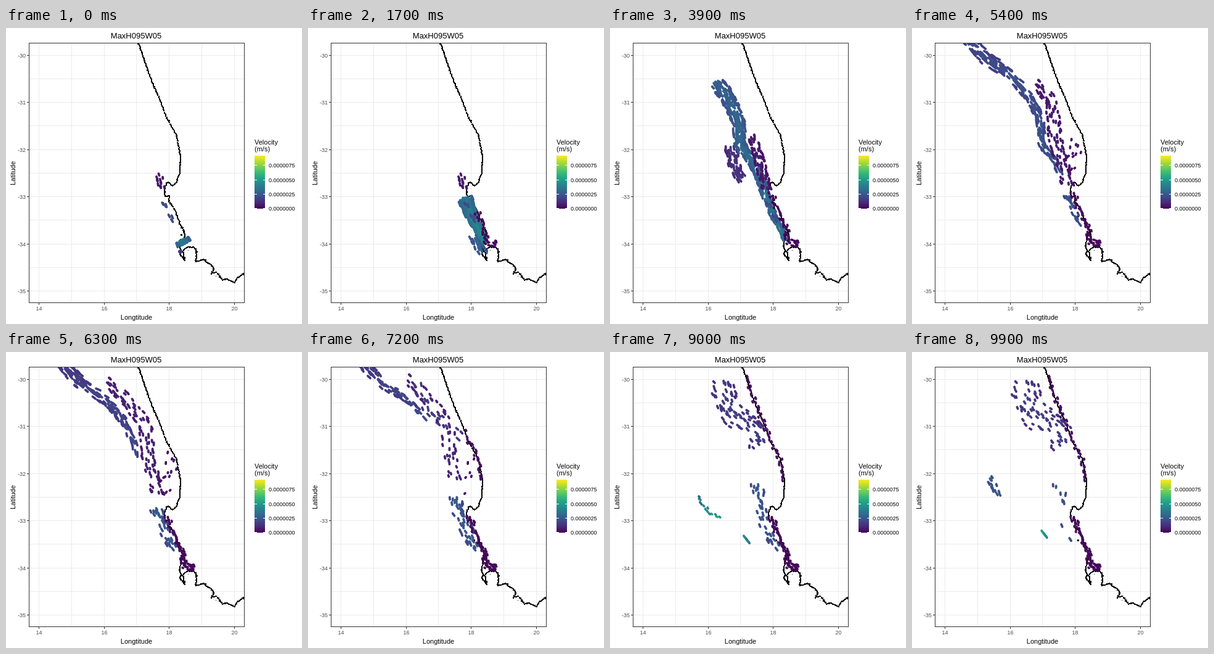
Recreate the animation shown at these times as an HTML page with a canvas. Size 480 by 480 pixels, loop 10 s.

```html
<!DOCTYPE html>
<html lang="en">
<head>
<meta charset="utf-8">
<title>Drift map</title>
<style>
  html, body { margin: 0; width: 100%; height: 100%; overflow: hidden; background: #fff; }
  svg, canvas, #bar { position: absolute; }
  svg { left: 0; top: 0; font: 11px "Liberation Sans", Arial, sans-serif; }
  canvas { left: 38px; top: 25px; }
  #bar { left: 403px; top: 207px; width: 17px; height: 86px; }
  .small { font-size: 9px; fill: #4d4d4d; }
  .line { fill: none; stroke: #333; shape-rendering: crispEdges; }
  .notch { stroke: #fff; }
</style>
</head>
<body>
<div id="bar"></div>
<canvas id="map" width="348" height="420"></canvas>
<svg id="chart" width="480" height="480">
  <text x="211" y="17" font-size="13" text-anchor="middle">MaxH095W05</text>
  <text x="211.5" y="473" text-anchor="middle">Longtitude</text>
  <text transform="translate(15 235.5) rotate(-90)" text-anchor="middle">Latitude</text>
  <text x="403" y="189">Velocity</text>
  <text x="403" y="200">(m/s)</text>
  <rect class="line" x="37.5" y="24.5" width="349" height="421"/>
</svg>
<script>
const LOOP = 10000, STEP = 100;
const VIRIDIS = ['#440154', '#482878', '#3e4a89', '#31688e', '#26828e',
                 '#1f9e89', '#35b779', '#6dcd59', '#b4de2c', '#fde725'];
const RGB = VIRIDIS.map(h => [1, 3, 5].map(i => parseInt(h.slice(i, i + 2), 16)));

const lerp = (a, b, t) => a + (b - a) * t;
const clamp = v => Math.min(1, Math.max(0, v));
// Goes from one value to another between two times
const ramp = (t, start, end, from, to) => lerp(from, to, clamp((t - start) / (end - start)));

let seed = 7;
const rand = () => (seed = seed * 16807 % 2147483647) / 2147483647;
const jitter = r => (rand() * 2 - 1) * r;

function colour(v) {
  const p = Math.min(.999, clamp(v)) * 9, i = Math.floor(p);
  return `rgb(${RGB[i].map((c, k) => Math.round(lerp(c, RGB[i + 1][k], p - i)))})`;
}

// Polyline measured by its length; at(u) gives the point at share u
function route(pts) {
  const legs = [];
  let total = 0;
  for (let i = 0; i < pts.length - 2; i += 2) {
    const [x, y, x2, y2] = pts.slice(i, i + 4);
    const size = Math.hypot(x2 - x, y2 - y);
    legs.push({ x, y, x2, y2, size, start: total });
    total += size;
  }
  const at = u => {
    const d = clamp(u) * total;
    const leg = legs.findLast(l => l.start <= d);
    const k = (d - leg.start) / leg.size;
    return [lerp(leg.x, leg.x2, k), lerp(leg.y, leg.y2, k)];
  };
  const angle = u => {
    const [x, y] = at(u - .04), [x2, y2] = at(u + .04);
    return Math.atan2(y2 - y, x2 - x);
  };
  return { total, at, angle };
}

// Axes, grid and legend
const chart = document.getElementById('chart');
const grid = new Path2D();
function add(tag, attrs, text) {
  const el = document.createElementNS('http://www.w3.org/2000/svg', tag);
  for (const k in attrs) el.setAttribute(k, attrs[k]);
  if (text) el.textContent = text;
  chart.append(el);
}
const line = (cls, d) => add('path', { class: 'line ' + cls, d });

for (let lon = 14; lon <= 20; lon++) {
  const x = Math.round(53 + (lon - 14) * 52.8) + .5;
  grid.rect(x - .5, 25, 1, 420);
  if (lon % 2) continue;
  line('', `M${x} 446v3`);
  add('text', { class: 'small', x, y: 458, 'text-anchor': 'middle' }, `${lon}`);
}
for (let lat = -30; lat >= -35; lat -= .5) {
  const y = Math.round(43.85 - (lat + 30) * 76.43) + .5;
  grid.rect(38, y - .5, 348, 1);
  if (lat % 1) continue;
  line('', `M34 ${y}h3`);
  add('text', { class: 'small', x: 32, y: y + 3, 'text-anchor': 'end' }, `${lat}`);
}
['0000', '0025', '0050', '0075'].forEach((digits, i) => {
  const y = Math.round(292 - i * 23.2) + .5;
  line('notch', `M403 ${y}h3.5M416.5 ${y}h3.5`);
  add('text', { class: 'small', x: 426, y: y + 3, style: 'fill:#000' }, '0.000' + digits);
});
document.getElementById('bar').style.background = `linear-gradient(to top, ${VIRIDIS})`;

// Coastline: key points joined by a rough row of pixel dots
const COAST = [
  215,25, 231,72, 250,118, 261,146, 276,173, 283,208, 282,235, 276,251, 270,256, 263,250,
  260,252, 257,261, 258,274, 265,272, 263,280, 270,289, 276,300, 282,317, 289,331, 290,342,
  284,343, 281,353, 284,360, 282,366, 290,377, 287,362, 291,357, 297,355, 305,356, 309,361,
  308,379, 323,375, 325,380, 333,384, 337,390, 333,398, 341,396, 351,408, 358,407, 371,413,
  375,405, 387,397];
const shore = new Path2D();
const coast = route(COAST);
const pixel = (x, y, size) => shore.rect(Math.round(x) - 1, Math.round(y) - 1, size, size);
for (let d = 0; d < coast.total; d += 1.1) {
  const [x, y] = coast.at(d / coast.total);
  pixel(x + jitter(.7), y + jitter(.7), 2);
}
pixel(269, 305, 3);
pixel(284, 335, 3);
pixel(296, 361, 1);
pixel(341, 403, 1);

// A swarm of dashes strung along a route. Settings are values or functions of
// time in seconds (and of q, the dash's share of the way from tail to head).
const swarms = [];
function swarm(n, pts, settings) {
  const dashes = Array.from({ length: n }, (_, i) => ({
    q: (i + rand()) / n, side: jitter(1), rank: rand(), turn: jitter(.2), size: 1 + jitter(.35),
  }));
  swarms.push({ path: route(pts), dashes, tail: 0, head: 1, keep: 1, bias: 1, ...settings });
}

// First release
swarm(45, [282,362, 283,363, 269,337], {
  head: t => ramp(t, 0, 1.1, .05, 1),
  width: t => ramp(t, 0, 1.1, 1.5, 8),
  keep: t => ramp(t, 0, .6, .3, 1) * ramp(t, 1.4, 2.2, 1, 0),
  len: t => ramp(t, 0, 1, 1, 5),
  speed: t => ramp(t, 0, 1, .2, .3),
});

// Western fringe
swarm(50, [240,296, 226,262, 204,235, 196,192], {
  tail: t => ramp(t, 2.4, 3.9, 0, .5),
  head: t => ramp(t, 2.2, 3.9, .3, 1),
  width: 10,
  keep: t => ramp(t, 2.1, 2.8, 0, 1) * ramp(t, 4, 5.4, 1, 0),
  len: 5,
  speed: t => ramp(t, 2.9, 3.9, .21, .14),
});

// Main plume along the current
swarm(330, [287,347, 264,302, 250,264, 233,218, 211,190, 208,150, 190,110, 160,76, 118,48, 68,-8], {
  tail: t => ramp(t, 4, 7, 0, .6),
  head: t => ramp(t, .9, 5.4, 0, 1),
  width: (t, q) => lerp(4, 13, q),
  keep: t => ramp(t, .9, 2.2, .2, 1) * ramp(t, 4, 8.4, 1, 0),
  bias: .75,
  len: 6,
  speed: (t, q) => ramp(t, 2.5, 6, .43, .19) * (1.15 - .3 * q),
});

// Slow inshore drift
swarm(110, [254,262, 244,222, 232,180, 226,120, 202,86, 166,46, 150,20], {
  tail: t => ramp(t, 5.2, 8.2, 0, .3),
  head: t => ramp(t, 2.9, 6.4, .1, .92),
  width: t => ramp(t, 3, 5, 6, 11),
  keep: t => ramp(t, 2.7, 4.5, .2, 1) * ramp(t, 6.3, 8.4, 1, .1),
  len: 3,
  speed: t => ramp(t, 5, 8, .07, .12),
});

// Eastern eddy
swarm(14, [248,228, 266,205, 274,165], {
  head: t => ramp(t, 4.6, 6.3, .5, 1),
  width: 12,
  keep: t => ramp(t, 4.4, 5.2, 0, 1) * ramp(t, 6.6, 7.8, 1, 0),
  len: 2,
  speed: .05,
});

// Late drift near the bay
swarm(55, [274,318, 256,285, 240,250, 238,214], {
  head: t => ramp(t, 4.8, 8.2, .35, 1),
  width: t => ramp(t, 5, 6.5, 2, 11),
  keep: t => ramp(t, 4.6, 8, .15, 1) * ramp(t, 8.2, 9.9, 1, .2),
  len: 4.5,
  speed: .26,
});

// Late drift in the north
swarm(75, [250,145, 222,118, 196,98, 178,50], {
  width: t => ramp(t, 7, 9.9, 10, 24),
  keep: t => ramp(t, 6.6, 8.2, 0, 1),
  len: t => ramp(t, 8, 9.9, 5, 3),
  speed: .17,
});

// Fast jet, then two short ones
swarm(14, [214,306, 195,283, 180,270, 161,260, 140,232, 125,203], {
  tail: t => ramp(t, 8.2, 9.9, .04, .76),
  head: t => ramp(t, 7.6, 9.9, .37, 1),
  width: t => ramp(t, 8.2, 9.9, 0, 5),
  keep: t => t < 7.7 ? 0 : 1,
  len: t => ramp(t, 8.2, 9.9, .5, 3),
  speed: (t, q) => ramp(t, 8.2, 9.4, 1.1, .28) - ramp(q, .5, 1, 0, .6) * ramp(t, 8.2, 9.4, 1, 0),
});
swarm(6, [232,317, 211,291], {
  tail: t => ramp(t, 8.2, 9.9, 0, .65),
  head: t => ramp(t, 8.2, 9.9, .4, 1),
  width: 0,
  keep: t => t < 7.7 ? 0 : 1,
  len: 3,
  speed: t => ramp(t, 8.2, 9.9, .38, .53),
});
swarm(7, [288,376, 273,368], {
  width: 0,
  keep: t => t < 7.7 || t > 8.8 ? 0 : 1,
  len: 2,
  speed: .4,
});

// Stranded on the southern and northern shores
swarm(75, [304,350, 289,346, 285,318, 270,290, 261,265], {
  head: t => ramp(t, .6, 2.4, .2, 1),
  width: 5,
  keep: t => ramp(t, .6, 1.5, 0, .5) + ramp(t, 2, 9, 0, .5),
  bias: 1.5,
  len: 1.5,
  speed: .02,
});
swarm(40, COAST.slice(0, 12), {
  tail: t => ramp(t, 6.6, 8.4, .8, .08),
  width: 4,
  keep: t => ramp(t, 6.4, 8.2, 0, 1),
  len: 2,
  speed: .03,
});

const ctx = document.getElementById('map').getContext('2d');
ctx.translate(-38, -25);
ctx.lineCap = 'round';
ctx.lineWidth = 3.8;

function drawBase() {
  ctx.fillStyle = '#fff';
  ctx.fillRect(38, 25, 348, 420);
  ctx.fillStyle = '#ebebeb';
  ctx.fill(grid);
  ctx.fillStyle = '#000';
  ctx.fill(shore);
}

function drawSwarm(s, t) {
  const get = (key, q) => typeof s[key] === 'function' ? s[key](t, q) : s[key];
  const tail = get('tail'), head = get('head'), keep = get('keep');
  for (const d of s.dashes) {
    if (d.rank >= keep) continue;
    const q = d.q ** s.bias, u = lerp(tail, head, q);
    const [px, py] = s.path.at(u), a = s.path.angle(u);
    const off = d.side * get('width', q);
    const x = px - Math.sin(a) * off, y = py + Math.cos(a) * off;
    const half = get('len', q) * d.size / 2;
    const dx = Math.cos(a + d.turn) * half, dy = Math.sin(a + d.turn) * half;
    ctx.strokeStyle = colour(get('speed', q) * (1.1 - .3 * Math.abs(d.side)));
    ctx.beginPath();
    ctx.moveTo(x - dx, y - dy);
    ctx.lineTo(x + dx, y + dy);
    ctx.stroke();
  }
}

const start = performance.now();
let shown = -1;
function tick() {
  const now = Math.max(0, performance.now() - start) % LOOP;
  const time = Math.floor(now / STEP) * STEP;
  if (time !== shown) {
    drawBase();
    for (const s of swarms) drawSwarm(s, time / 1000);
    shown = time;
  }
  requestAnimationFrame(tick);
}
tick();
</script>
</body>
</html>
```
